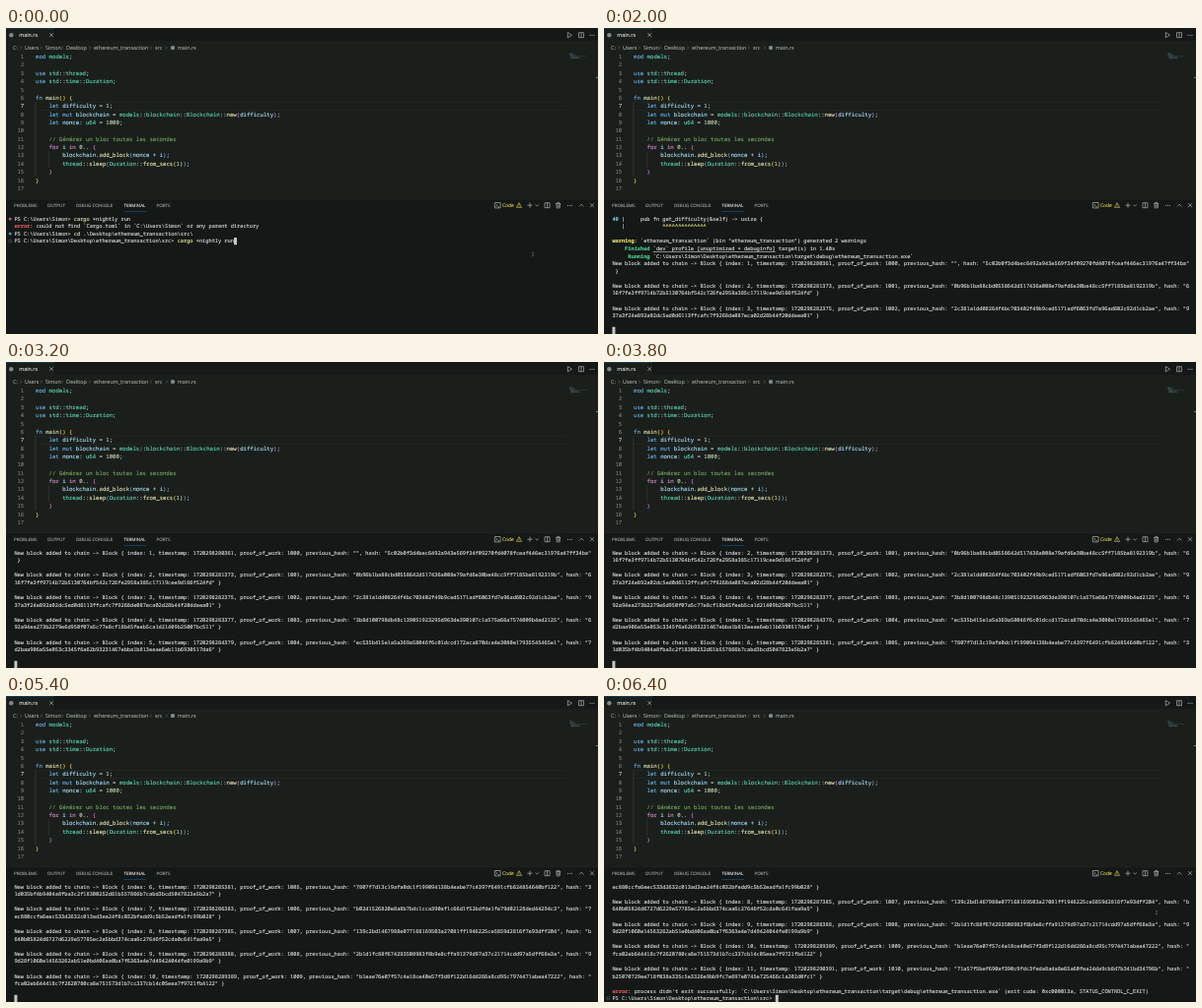
Write an HTML page that moves like this. It is 600x311 px and loops after 6.6 s.

```html
<!DOCTYPE html>
<html lang="en">
<head>
<meta charset="utf-8">
<title>Terminal</title>
<style>
html, body { margin: 0; width: 100%; height: 100%; overflow: hidden; background: #141816; }
svg { display: block; width: 600px; height: 311px; }
text { white-space: pre; text-rendering: geometricPrecision; color: #d6d9d6; }
text, tspan { fill: currentColor; stroke: currentColor; stroke-width: .13px; }
.mono { font: 5.667px "Noto Sans Mono", monospace; }
.term { font: 5.3px "Noto Sans Mono", monospace; }
.ui { font: 5.4px "Open Sans", "Noto Sans", sans-serif; }
.tab { font: 4.55px "Open Sans", "Noto Sans", sans-serif; }
.small { font-size: 4.9px; }
.dim { color: #989e9a; }
.num { color: #727a75; text-anchor: end; }
.k { color: #6aa6d6; } .c { color: #c58cc0; } .t { color: #5cc8b0; }
.f { color: #dcdcaa; } .v { color: #a4d8f4; } .n { color: #b9cfac; }
.m { color: #6f9c5c; } .b1 { color: #e2cc58; } .b2 { color: #c87cc4; } .b3 { color: #58a6dc; }
.yel { color: #ece89a; }
.red { color: #dc5a62; font-weight: 700; }
.warn { color: #e8e270; font-weight: 700; }
.ok { color: #4fce94; font-weight: 700; }
.cy { color: #86c4dc; font-weight: 700; }
.bold { font-weight: 700; }
.link { text-decoration: underline; text-decoration-thickness: .35px; }
.icon { fill: none; stroke: #b9bdba; stroke-width: .65; }
</style>
</head>
<body>
<svg id="stage" viewBox="0 0 600 311"></svg>
<script>
const NS = 'http://www.w3.org/2000/svg';
const stage = document.getElementById('stage');

function el(tag, attrs, parent = stage) {
  const node = document.createElementNS(NS, tag);
  for (const key in attrs) node.setAttribute(key, attrs[key]);
  return parent.appendChild(node);
}
const rect = (x, y, width, height, fill, parent) => el('rect', { x, y, width, height, fill }, parent);
const path = (d, extra) => el('path', { d, class: 'icon', ...extra });
const dot = (cx, cy, r, attrs, parent) => el('circle', { cx, cy, r, ...attrs }, parent);

function label(x, y, cls, str) {
  el('text', { x, y, class: cls }).textContent = str;
}

// parts alternates class name and text
function rich(x, y, cls, parts, parent) {
  const node = el('text', { x, y, class: cls }, parent);
  for (let i = 0; i < parts.length; i += 2)
    el('tspan', { class: parts[i] }, node).textContent = parts[i + 1];
  return node;
}

// ---- window frame ----
const ACCENT = '#1070b8';
rect(0, 0, 600, 311, '#141816');
rect(0, 14, 600, 159, '#1a1f1b');
rect(0, 0, 49, 14, '#1a1f1b');
rect(0, 0, 49, .3, ACCENT);
rect(49, 13.6, 551, .45, '#242925');
rect(0, 173, 600, .45, '#2b302c');

dot(5.3, 7.2, 2.2, { fill: '#7e8a90' });
label(13.2, 9.1, 'ui', 'main.rs');
path('M44.3 5.3l3.6 3.6m0-3.6l-3.6 3.6');

const crumbs = [[7, 'C:'], [19, 'Users'], [40, 'Simon'], [61, 'Desktop'], [89, 'ethereum_transaction'], [151, 'src']];
const arrows = [14.5, 35, 56.5, 84.2, 146, 162];
crumbs.forEach(([x, str], i) => {
  label(x, 21.9, 'ui dim', str);
  path(`M${arrows[i]} 18.6l1.5 1.5l-1.5 1.5`, { style: 'stroke:#7c827e;stroke-width:.5' });
});
dot(169, 20.1, 2.2, { fill: '#7e8a90' });
label(173.8, 21.9, 'ui dim', 'main.rs');

function dots(x, y) {
  for (const dx of [-2, 0, 2]) dot(x + dx, y, .55, { fill: '#b9bdba' });
}
function split(x, y) {
  path(`M${x - 2.5} ${y - 2.5}h5v5h-5zM${x} ${y - 2.5}v5`);
}
path('M569.3 4.5v5.4l4.2-2.7z');
split(583, 7.2);
dots(594, 7.2);

// ---- editor ----
const code = [
  ['k', 'mod', '', ' ', 't', 'models', '', ';'],
  [],
  ['k', 'use ', 't', 'std', '', '::', 't', 'thread', '', ';'],
  ['k', 'use ', 't', 'std', '', '::', 't', 'time', '', '::', 't', 'Duration', '', ';'],
  [],
  ['k', 'fn ', 'f', 'main', 'b1', '() {'],
  ['k', '    let ', 'v', 'difficulty', '', ' = ', 'n', '1', '', ';'],
  ['k', '    let mut ', 'v', 'blockchain', '', ' = ', 't', 'models', '', '::', 't', 'blockchain', '', '::',
    't', 'Blockchain', '', '::', 'f', 'new', 'b2', '(', 'v', 'difficulty', 'b2', ')', '', ';'],
  ['k', '    let ', 'v', 'nonce', '', ': ', 't', 'u64', '', ' = ', 'n', '1000', '', ';'],
  [],
  ['m', '    // Générer un bloc toutes les secondes'],
  ['c', '    for ', 'v', 'i', 'c', ' in ', 'n', '0', '', '.. ', 'b2', '{'],
  ['v', '        blockchain', '', '.', 'f', 'add_block', 'b3', '(', 'v', 'nonce', '', ' + ', 'v', 'i', 'b3', ')', '', ';'],
  ['t', '        thread', '', '::', 'f', 'sleep', 'b3', '(', 't', 'Duration', '', '::', 'f', 'from_secs',
    'b1', '(', 'n', '1', 'b1', ')', 'b3', ')', '', ';'],
  ['b2', '    }'],
  ['b1', '}'],
  []
];
const codeY = i => 29.1 + i * 8.36;

for (const dy of [-4.2, 4.1]) rect(29.5, codeY(6) + dy, 538, .45, '#282e2a');
rect(29.7, codeY(6) - 4, .5, 9 * 8.36, '#454c47');
rect(43.3, codeY(12) - 4, .5, 2 * 8.36, '#3c423e');
rect(598, 50, 2, .9, '#8d928e');

code.forEach((parts, i) => {
  const num = el('text', { x: 18.2, y: codeY(i) + 2, class: 'mono num' });
  num.textContent = i + 1;
  if (i === 6) num.style.color = '#d6d9d6';
  rich(30, codeY(i) + 2, 'mono', parts);
  const str = parts.filter((_, j) => j % 2).join('');
  const indent = str.length - str.trimStart().length;
  const bar = rect(571 + indent * .24, 25 + i * .44, (str.length - indent) * .24, .35, 'currentColor');
  bar.setAttribute('class', parts[0] || '');
  bar.setAttribute('opacity', .45);
});

// ---- panel header ----
[[8, 'PROBLEMS'], [42, 'OUTPUT'], [71, 'DEBUG CONSOLE'], [119.5, 'TERMINAL'], [152.5, 'PORTS']].forEach(([x, str]) =>
  label(x, 182, str === 'TERMINAL' ? 'tab' : 'tab dim', str));
rect(119.5, 186.5, 22.7, .45, ACCENT);

path('M495.3 177.5h5.8v5.4h-5.8zM496.6 179l1.4 1.2l-1.4 1.2M498.4 181.7h1.6');
label(503, 182, 'ui small b1', 'Code');
path('M520 177.6l2.6 4.8h-5.2zM520 179.2v1.6M520 181.3v.5', { style: 'stroke:#d0be50' });
path('M528.4 180.2h5.2M531 177.6v5.2M536.6 179.5l1.6 1.6l1.6-1.6');
split(548.5, 180.2);
path('M557.2 178.4h5M558.8 178.4v-1h1.8v1M557.8 178.4l.4 4.5h3l.4-4.5M559.2 179.5v2.3M560.3 179.5v2.3');
dots(571.5, 180.2);
path('M581 181.4l2.2-2.2l2.2 2.2M592 178.2l4 4m0-4l-4 4');

// ---- terminal ----
const LOOP = 6600, ROWS = 16, COLS = 184, CHAR = 3.18, LEFT = 8.4, PITCH = 7.56;
const rowY = i => 193.9 + i * PITCH;
const home = 'C:\\Users\\Simon';
const project = home + '\\Desktop\\ethereum_transaction';
const prompt = `PS ${project}\\src> `;
const exe = `${project}\\target\\debug\\ethereum_transaction.exe`;
const term = el('g', {});
const rows = [];

// from/to: time span; mark: colour of the command dot; col: caret column while it is the last row
function print(from, parts, { to = LOOP, mark, col } = {}) {
  const node = el('g', { display: 'none' }, term);
  rich(LEFT, 1.9, 'term', parts, node);
  if (mark) dot(4.2, 0, 1.5, mark === 'open' ? { fill: 'none', stroke: '#686e6a', 'stroke-width': .6 } : { fill: mark }, node);
  rows.push({ node, from, to, col });
}

print(0, ['', `PS ${home}> `, 'yel', 'cargo', '', ' +nightly run'], { mark: '#c0586a' });
print(0, ['red', 'error', '', `: could not find \`Cargo.toml\` in \`${home}\` or any parent directory`]);
print(0, ['', `PS ${home}> `, 'yel', 'cd', '', ' .\\Desktop\\ethereum_transaction\\src\\'], { mark: '#4f94bc' });
print(0, ['', prompt, 'yel', 'cargo', '', ' +nightly run'], { mark: 'open', col: prompt.length + 18 });

print(200, [], { to: 400 });
print(400, ['ok', '   Compiling', '', ` ethereum_transaction v0.1.0 (${project})`]);
print(400, ['cy', '    Building', '', ' [                           ] 0/1: ethereum_transaction(bin)'], { to: 800 });

print(800, ['warn', 'warning', 'bold', ': methods `get_genesis_block` and `get_difficulty` are never used']);
print(800, ['cy', '  --> ', '', 'src\\models\\blockchain.rs:44:12']);
print(800, ['cy', '   |']);
print(800, ['cy', '11 | ', '', 'impl Blockchain {']);
print(800, ['cy', '   | ' + '-'.repeat(15) + ' methods in this implementation']);
[[44, 'get_genesis_block', '&Block'], [49, 'get_difficulty', 'usize']].forEach(([line, name, type]) => {
  print(800, ['cy', '...']);
  print(800, ['cy', line + ' | ', '', `    pub fn ${name}(&self) -> ${type} {`]);
  print(800, ['cy', '   | ', 'warn', ' '.repeat(11) + '^'.repeat(name.length)]);
});
print(800, []);
print(800, ['warn', 'warning', '', ': `ethereum_transaction` (bin "ethereum_transaction") generated 2 warnings']);
print(1000, ['ok', '    Finished', '', ' ', 'link', '`dev` profile [unoptimized + debuginfo]', '', ' target(s) in 1.40s']);
print(1000, ['ok', '     Running', '', ` \`${exe}\``]);

// previous hash, hash
const blocks = [
  ['', '5c02b0f3d4bec6492a943e569f34f09270fd4078fceaf446ec31976a47ff34ba'],
  ['0b96b1ba88cbd0558642d517436a008e79afd6e30be48cc5ff7185ba8192319b', '616f7fe3ff9714b72b5130764bf542c726fe2958a385c17119cee9d166f524fd'],
  ['2c381a1dd08264f4bc703402f49b9ced5171adf6063fd7e96ad602c92d1cb2ae', '937a3f24e892a02dc5ed0d6113ffcafc7f9268de087eca02d28b44f20ddeea01'],
  ['3b8d100798db48c139051923295d963de390107c1a575a66a7574009b4ed2125', '692a94ea273b2279e6d950f07a5c77e8cf18b45feeb5ca1d21409b25007bc511'],
  ['ec535b415e1a5a369a58046f6c01dccd172aca870dca4e3080e17935545465e1', '7d2baa906a55e053c3345f6a62b93231467ebba1b813eeae6eb11b6930517da6'],
  ['7807f7d13c19afa0dc1f199094138b4eabe77c4397f6491cfb824854640bf122', '31d035bf4b9404a8fba3c2f18300252d61b557866b7cabd3bcd5047823e5b2a7'],
  ['b02d1526820e8a8b7bdc1cca390af1c66d1f52bdfde1fe79d02128ded44294c3', '7ec880ccfa6eec533d2632c013ad3ea24f8c032bfedd9c5b52eadfa1fc99b028'],
  ['139c2bd1467988e077168169503a27081ff1946225ce5859d2816f7e93dff204', 'b640b05824d6727d6229e57785ec2e5bbd374caa6c27646f52cda0c641faa9e5'],
  ['2b1d1fc88f674293508983f8b9e8cffa91379d97a37c21714cdd97a5dff68e3a', '99d28f1060e14563262ab51e0bd406aa0ba7f6363e4e7d49424044fe0199a9b9'],
  ['b1eae76e07f57c4e18ce40e57f3d8f122d16dd266a8cd95c7974471abea47222', 'fca02eb644418c7f2620780ca8e751573d1b7cc337cb14c05eea7f9721fb4122'],
  ['71a57f5bef690af390c9fdc3feda8ada8e65a60fea24da9cb8d7b341bd34796b', 'b25070729ee718f038a335c5e3326e9bb9fc7e697e0745e725466c1a202d0fc1']
];
blocks.forEach(([prev, hash], i) => {
  const at = Math.ceil((900 + i * 500) / 200) * 200;
  const stamp = 1720298280361 + i * 1002 + (i ? 10 : 0) + (i === 8 ? 1 : 0);
  const str = `New block added to chain -> Block { index: ${i + 1}, timestamp: ${stamp}, ` +
    `proof_of_work: ${1000 + i}, previous_hash: "${prev}", hash: "${hash}" }`;
  print(at, ['', str.slice(0, COLS)]);
  print(at, ['', str.slice(COLS)]);
  print(at, []);
});

print(6200, ['red', 'error', '', `: process didn't exit successfully: \`${exe}\` (exit code: 0xc000013a, STATUS_CONTROL_C_EXIT)`]);
print(6200, ['', prompt], { mark: 'open', col: prompt.length });

const caret = rect(0, 0, 3, 7.2, '#c4c8c5');
const mouse = path('M-.8-1.8q.8 0 .8 .6v2.4q0 .6-.8 .6M.8-1.8q-.8 0-.8 .6M.8 1.8q-.8 0-.8-.6', { style: 'stroke-width:.5', opacity: .7 });

function draw(t) {
  const shown = rows.filter(r => r.from <= t && t < r.to);
  const last = shown[shown.length - 1];
  const onRow = last.col !== undefined;
  const total = shown.length + (onRow ? 0 : 1);
  const top = Math.max(0, total - ROWS);
  for (const r of rows) r.node.setAttribute('display', 'none');
  shown.slice(top).forEach((r, i) => {
    r.node.setAttribute('display', 'inline');
    r.node.setAttribute('transform', `translate(0 ${rowY(i)})`);
  });
  caret.setAttribute('x', LEFT + (onRow ? last.col * CHAR : 0));
  caret.setAttribute('y', rowY(total - 1 - top) - 3.5);
  mouse.setAttribute('transform', t < 1400 ? 'translate(534 230)' : 'translate(560 220)');
  mouse.setAttribute('display', t < 1400 || t >= 6200 ? 'inline' : 'none');
}

const start = performance.now();
let step = -1;
function tick() {
  const now = Math.floor((performance.now() - start) % LOOP / 200);
  if (now !== step) draw((step = now) * 200);
  requestAnimationFrame(tick);
}
tick();
</script>
</body>
</html>
```
